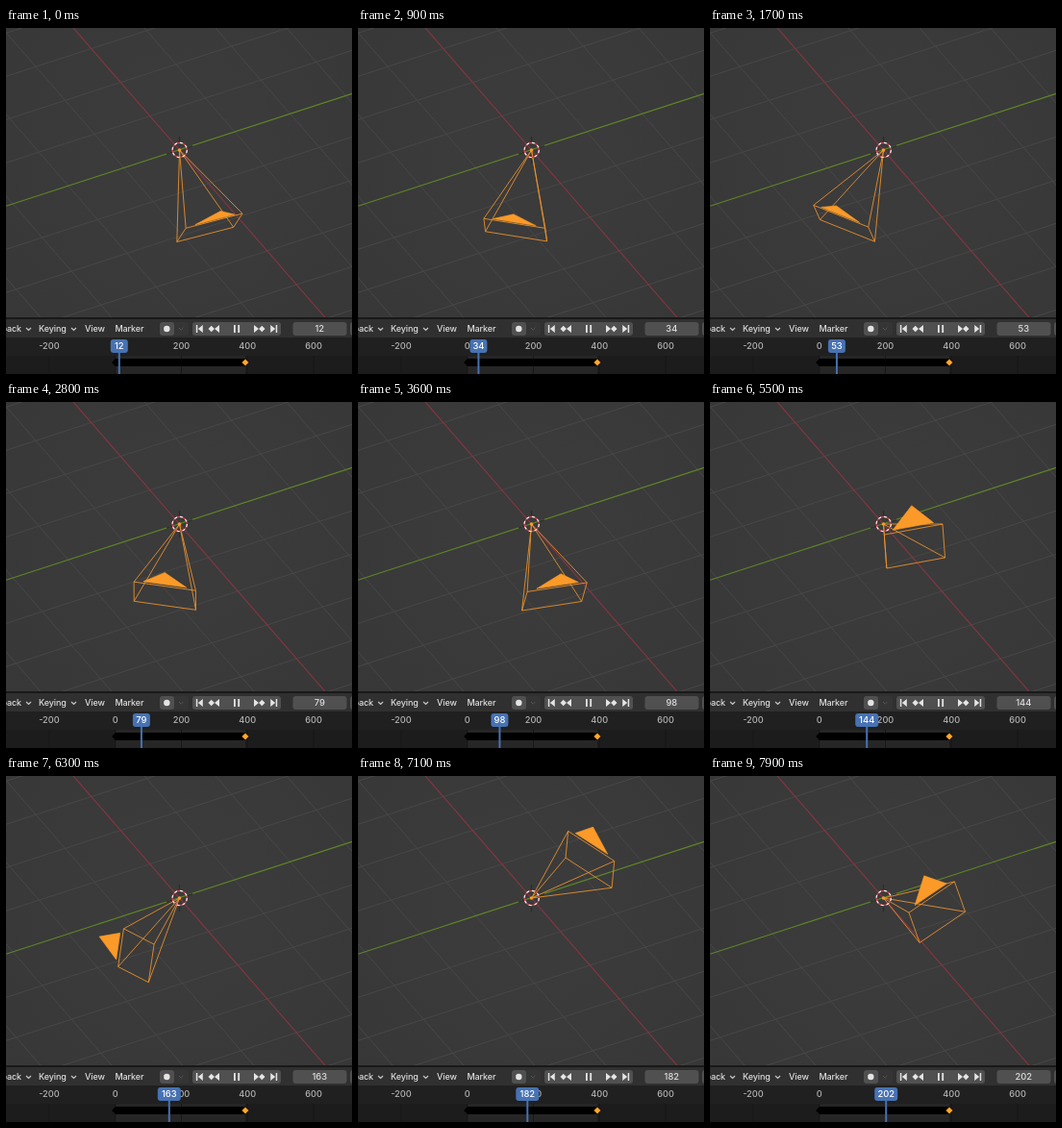
An HTML page for the animation above (8000 ms loop, 360 px wide and 360 px high).

```html
<!DOCTYPE html>
<html lang="en">
<head>
<meta charset="utf-8">
<title>Rotating camera</title>
<style>
  html, body { margin: 0; width: 100%; height: 100%; overflow: hidden; background: #3b3b3b; }
  svg { display: block; width: 100vw; height: 100vh; }
  text { font: 500 9px Inter, "Open Sans", sans-serif; letter-spacing: -.12px; fill: #dedede; }
  .mid { text-anchor: middle; letter-spacing: 0; font-size: 9.4px; }
  .end { text-anchor: end; }
  .ruler text { font-size: 9.2px; fill: #b4b4b4; }
  .chevron { fill: none; stroke: #c4c4c4; stroke-width: 1.2; }
  .icon { fill: #e4e4e4; }
  #wire { fill: none; stroke: #f0942e; stroke-opacity: .85; stroke-linejoin: round; }
  #tri { fill: #fb9a28; stroke: #fb9a28; stroke-width: .6; stroke-linejoin: round; }
</style>
</head>
<body>
<svg viewBox="0 0 360 360">
  <defs>
    <radialGradient id="shade" gradientUnits="userSpaceOnUse" cx="180" cy="130" r="260">
      <stop offset=".3" stop-color="#3b3b3b"/>
      <stop offset="1" stop-color="#373737"/>
    </radialGradient>
  </defs>
  <rect width="360" height="360" fill="url(#shade)"/>
  <path id="grid" fill="none" stroke="#474747"/>
  <path d="M70 0L332.700 302" stroke="#8c3444" stroke-width="1.1"/>
  <path d="M0 185.300L360 68.300" stroke="#5f8726" stroke-width="1.1"/>

  <!-- 3D cursor, its arms along the axes -->
  <path d="M167 131.200l6-2M188 124.700l6-2M180.500 113v6M180.500 135v6" stroke="#2c2c2c" stroke-width="1.300"/>

  <path id="wire"/>
  <path id="tri"/>

  <circle cx="180.500" cy="127" r="1.800" fill="#f59a30"/>
  <g fill="none" stroke-width="1.200">
    <circle cx="180.700" cy="127" r="7.600" stroke="#d8414b"/>
    <circle cx="180.700" cy="127" r="7.600" stroke="#f4f4f4" stroke-dasharray="2.985"/>
  </g>

  <!-- timeline header -->
  <rect y="301" width="360" height="59" fill="#191919"/>
  <rect y="303" width="360" height="19" fill="#303030"/>
  <text class="end" x="16" y="316.300">Playback</text>
  <text x="34" y="316.300">Keying</text>
  <text x="82" y="316.300">View</text>
  <text x="113.500" y="316.300">Marker</text>
  <path class="chevron" d="M21 312l2.500 2.500 2.500-2.500M68 312l2.500 2.500 2.500-2.500"/>
  <rect x="160" y="306" width="30" height="14" rx="3" fill="#353535"/>
  <rect x="160" y="306" width="15" height="14" rx="3" fill="#505050"/>
  <circle class="icon" cx="167.300" cy="313" r="3.200"/>
  <path d="M180 312l2.200 2.200 2.200-2.200" fill="none" stroke="#555"/>
  <rect x="194" y="306" width="92" height="14" rx="3" fill="#505050"/>
  <g id="skip" class="icon">
    <path d="M197.800 309h1.500v8h-1.500zM204.800 309v8l-5-4z"/>
    <path d="M210.500 313l3.200-3.200 3.200 3.200-3.200 3.200zM222 309v8l-5-4z"/>
  </g>
  <use href="#skip" transform="matrix(-1 0 0 1 480 0)"/>
  <path class="icon" d="M237 309h1.800v8h-1.800zM241.300 309h1.800v8h-1.800z"/>
  <rect x="298.500" y="306" width="56" height="14" rx="3" fill="#505050"/>
  <rect x="358" y="306" width="8" height="14" rx="3" fill="#505050"/>
  <text id="field" class="mid" x="326.300" y="316.400"></text>

  <!-- ruler and keys -->
  <rect y="322" width="360" height="19" fill="#202020"/>
  <rect y="341" width="360" height="19" fill="#1c1c1c"/>
  <rect x="114" y="341" width="135" height="19" fill="#262626"/>
  <g id="ruler" class="ruler"></g>
  <path d="M110 348l4-4h135v8H114z" fill="#000"/>
  <path d="M249 344.200l3.800 3.800-3.800 3.800-3.800-3.800z" fill="#ffa928" stroke="#000" stroke-width=".6"/>
  <g id="head">
    <path d="M0 336V360" stroke="#4772b3" stroke-width="2"/>
    <rect id="tag" y="324" height="14" rx="3" fill="#4772b3"/>
    <text id="tagText" class="mid" y="334.400" style="fill:#fff"></text>
  </g>
</svg>
<script>
const $ = id => document.getElementById(id);
const RAD = Math.PI / 180;
const ORIGIN = [180.5, 127];
const UNIT = 32.6;              // half the width of the camera frame, in px
const DEPTH = 2.78, HALF_H = 0.5625;
const TILT = Math.asin(0.61);   // elevation of the view
const LOOP = 8000, STEP = 100;

// [ms, degrees]
const YAW = [[0, 24.1], [1700, -31.1], [2800, -10.2], [4500, 37.1], [5500, 22.4],
  [6000, -25], [6300, -95], [7100, -222.2], [7900, -319.1]];
const PITCH = [[0, -31.9], [1700, -29.1], [2800, -18.9], [4500, -24.1], [5300, 25],
  [5500, 20.3], [6300, -60], [7100, -0.6], [7350, 0.5], [7900, 20]];
const ROLL = [[0, 2.4], [1700, 4.5], [2800, 3.2], [4500, 2.7], [5500, 3.8],
  [7100, -5], [7900, -6.2]];

// Smooth curve through the keys without overshoot
function curve(keys, t) {
  const last = keys.length - 2;
  let i = 0;
  while (i < last && t > keys[i + 1][0]) i++;
  const slope = k => (keys[k + 1][1] - keys[k][1]) / (keys[k + 1][0] - keys[k][0]);
  const tangent = k => {
    if (k === 0) return slope(0);
    if (k > last) return slope(last);
    const a = slope(k - 1), b = slope(k);
    return a * b > 0 ? 2 * a * b / (a + b) : 0;
  };
  const [t0, v0] = keys[i], [t1, v1] = keys[i + 1];
  const h = t1 - t0, u = (t - t0) / h, w = 1 - u;
  return v0 * (1 + 2 * u) * w * w + tangent(i) * h * u * w * w
       + v1 * u * u * (3 - 2 * u) - tangent(i + 1) * h * u * u * w;
}

// Axes are screen right, level towards the viewer, and up
function project([x, y, z]) {
  return [ORIGIN[0] + UNIT * x,
          ORIGIN[1] + UNIT * (y * Math.sin(TILT) - z * Math.cos(TILT))];
}

function drawCamera(t) {
  const [yaw, pitch, roll] = [YAW, PITCH, ROLL].map(k => curve(k, t) * RAD);
  const { sin, cos } = Math;
  const front = [sin(yaw) * cos(pitch), cos(yaw) * cos(pitch), sin(pitch)];
  const side = [-cos(yaw), sin(yaw), 0];
  const top = [-sin(yaw) * sin(pitch), -cos(yaw) * sin(pitch), cos(pitch)];
  const right = side.map((s, i) => s * cos(roll) + top[i] * sin(roll));
  const up = top.map((p, i) => p * cos(roll) - side[i] * sin(roll));
  const at = (x, y) =>
    project(front.map((f, i) => f * DEPTH + right[i] * x + up[i] * y))
      .map(v => v.toFixed(2)).join(" ");

  const corners = [at(-1, -HALF_H), at(1, -HALF_H), at(1, HALF_H), at(-1, HALF_H)];
  $("wire").setAttribute("d", "M" + corners.join("L") + "Z" +
    corners.map(c => `M${ORIGIN.join(" ")}L${c}`).join(""));
  $("tri").setAttribute("d", "M" +
    [at(-0.7, HALF_H + 0.1), at(0.7, HALF_H + 0.1), at(0, HALF_H + 0.8)].join("L") + "Z");
}

function drawFrameNumber(n) {
  const wide = n > 99 ? 24 : 18;
  $("field").textContent = $("tagText").textContent = n;
  $("tag").setAttribute("x", -wide / 2);
  $("tag").setAttribute("width", wide);
  $("head").setAttribute("transform", `translate(${(113.7 + n * 0.344).toFixed(1)} 0)`);
}

function buildStatic() {
  let d = "";
  for (let k = -8; k <= 8; k++) {
    if (!k) continue;
    const y = 185.3 + 45 * k, x = 70 + 74 * k;
    d += `M0 ${y}L360 ${y - 117}M${x} 0L${x + 262.7} 302`;
  }
  $("grid").setAttribute("d", d);
  $("ruler").innerHTML = [-200, 0, 200, 400, 600].map(n => {
    const x = 113.7 + n * 0.344;
    return `<path d="M${x} 341V360" stroke="#171717"/>` +
      `<text class="mid" x="${x}" y="334.300">${n}</text>`;
  }).join("");
}

const start = performance.now();
let shown = -1;
function tick() {
  const step = Math.floor((performance.now() - start) % LOOP / STEP);
  if (step !== shown) {
    shown = step;
    drawCamera(step * STEP);
    drawFrameNumber(Math.round(12 + step * 2.4));
  }
  requestAnimationFrame(tick);
}

buildStatic();
tick();
</script>
</body>
</html>
```
